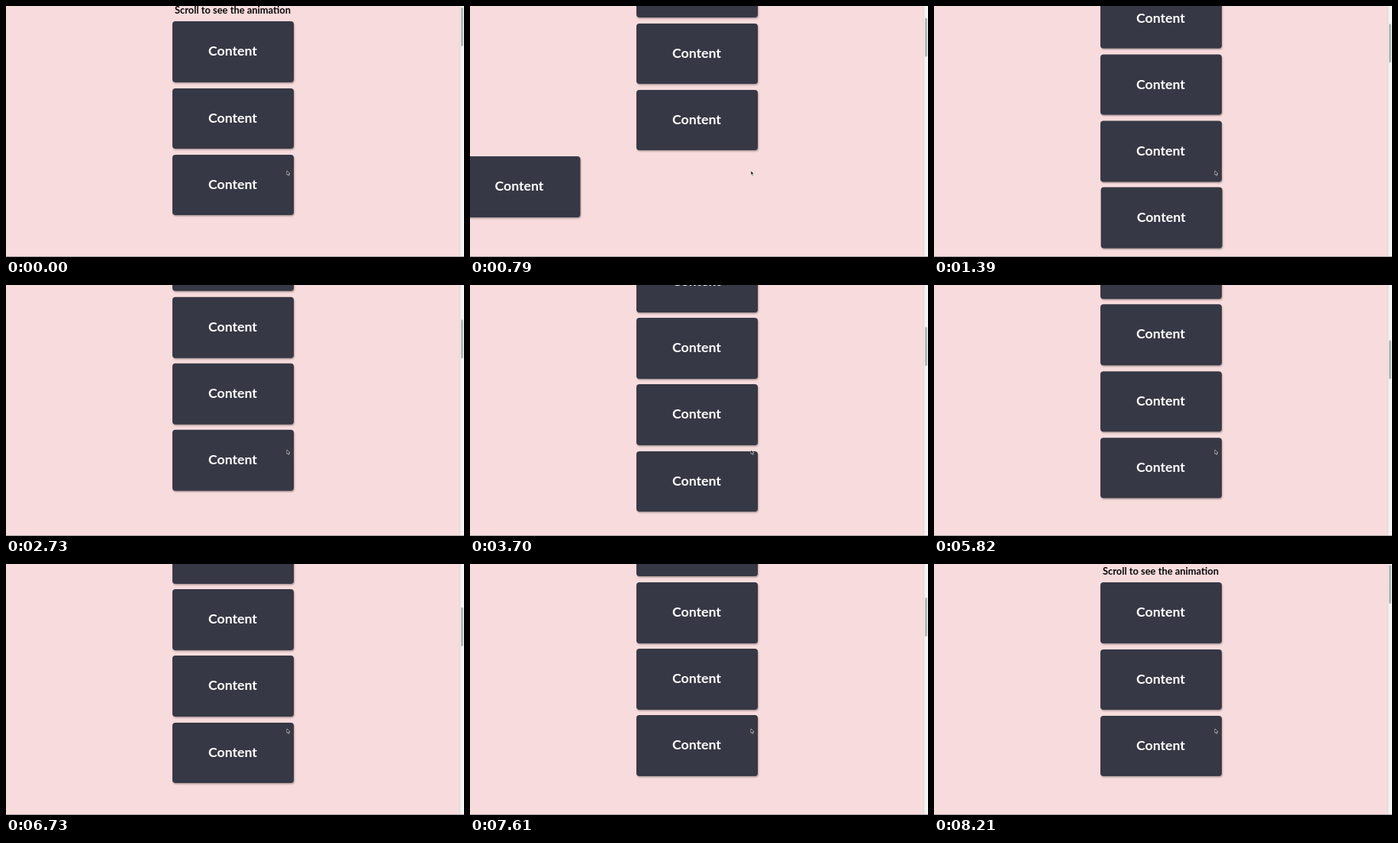
An HTML page that plays this animation: 600x329 px, repeating every 8820 ms.

```html
<!DOCTYPE html>
<html lang="en">
<head>
<meta charset="utf-8">
<title>Scroll animation</title>
<style>
  html, body { margin: 0; width: 100%; height: 100%; overflow: hidden; }
  body { position: relative; background: #f8dcdd; font-family: Lato, sans-serif; font-weight: 700; }
  #view { position: absolute; left: 0; top: 0; width: 594px; height: 328px; overflow: hidden; }
  #page { position: absolute; left: 0; top: 0; width: 594px; }
  h1 {
    position: absolute; left: 0; top: 1.2px; width: 100%; margin: 0;
    font-size: 12.9px; line-height: 16px; text-align: center; color: #0b0809;
  }
  .card {
    position: absolute; left: 217.5px; width: 159px; height: 79.6px;
    border-radius: 4px; background: #373845; color: #fff;
    font-size: 17.7px; line-height: 77.5px; text-align: center;
    box-shadow: .8px 1.6px 2px rgba(0, 0, 0, .32);
  }
  #track {
    position: absolute; left: 593px; top: 0; width: 7px; height: 328px;
    background: linear-gradient(90deg, #f2d8d9, #e6dedd 20%, #f4f2f1 45%, #f8f8f7);
  }
  #thumb {
    position: absolute; left: 2.5px; top: 1px; width: 3.3px; height: 51px;
    border-radius: 2px; background: #b4b8b4;
  }
  #edge { position: absolute; left: 0; top: 328px; width: 600px; height: 1px; background: #aaa2a4; }
  #cursor { position: absolute; left: 367px; top: 215px; }
</style>
</head>
<body>
<div id="view"><div id="page"><h1>Scroll to see the animation</h1></div></div>
<div id="track"><div id="thumb"></div></div>
<div id="edge"></div>
<svg id="cursor" width="7" height="9" viewBox="0 0 7 9">
  <path d="M1 1V6.4L2.3 5.3L3.2 7.4L4.2 7L3.3 4.9H5Z" fill="#111" stroke="#e8e8ea" stroke-width=".6"/>
</svg>
<script>
const LOOP = 8820, SLIDE = 400, COUNT = 9;
const FIRST = 24.4, PITCH = 87.2, FAR = 158.6 * 4, TRIGGER = 240;
const START_SCROLL = 4;

// Each swipe eases the page to a new scroll offset
const swipes = [
  { from: 0, until: 60, to: 4.5 },
  { from: 390, until: 1060, to: 135.5 },
  { from: 1480, until: 2227, to: 267.8 },
  { from: 2580, until: 2860, to: 272.3 },
  { from: 2900, until: 3490, to: 330 },
  { from: 4000, until: 4738, to: 494.3 },
  { from: 5450, until: 6150, to: 385 },
  { from: 6420, until: 7180, to: 262 },
  { from: 7610, until: 8205, to: 0 }
];

const clamp = x => Math.min(1, Math.max(0, x));
const smooth = x => x * x * (3 - 2 * x);

function scrollAt(t) {
  return swipes.reduce((y, { from, until, to }) =>
    y + (to - y) * smooth(clamp((t - from) / (until - from))), START_SCROLL);
}

// CSS "ease": cubic-bezier(.25, .1, .25, 1)
function ease(x) {
  if (x <= 0) return 0;
  if (x >= 1) return 1;
  const bez = (p, q, s) => 3 * p * s * (1 - s) ** 2 + 3 * q * s * s * (1 - s) + s ** 3;
  let lo = 0, hi = 1;
  for (let k = 0; k < 24; k++) {
    const mid = (lo + hi) / 2;
    if (bez(.25, .25, mid) < x) lo = mid; else hi = mid;
  }
  return bez(.1, 1, lo);
}

const page = document.getElementById('page');
const thumb = document.getElementById('thumb');

const cards = Array.from({ length: COUNT }, (_, i) => {
  const el = document.createElement('div');
  const top = FIRST + PITCH * i;
  el.className = 'card';
  el.textContent = 'Content';
  el.style.top = top + 'px';
  page.append(el);
  return { el, top, side: i % 2 ? -1 : 1, show: Infinity, hide: Infinity };
});

// Find when each card crosses the trigger line
for (const card of cards) {
  let shown = card.top - scrollAt(0) < TRIGGER;
  if (shown) card.show = -SLIDE;
  for (let t = 0; t < LOOP; t += 4) {
    const now = card.top - scrollAt(t) < TRIGGER;
    if (now !== shown) card[now ? 'show' : 'hide'] = t;
    shown = now;
  }
}

function draw(t) {
  const y = scrollAt(t);
  page.style.transform = `translateY(${-y}px)`;
  thumb.style.transform = `translateY(${y * .164}px)`;
  for (const { el, side, show, hide } of cards) {
    const away = t < hide ? 1 - ease((t - show) / SLIDE) : ease((t - hide) / SLIDE);
    el.style.transform = `translateX(${side * FAR * away}px)`;
  }
}

const start = performance.now();
function tick() {
  draw((performance.now() - start) % LOOP);
  requestAnimationFrame(tick);
}
tick();
</script>
</body>
</html>
```
